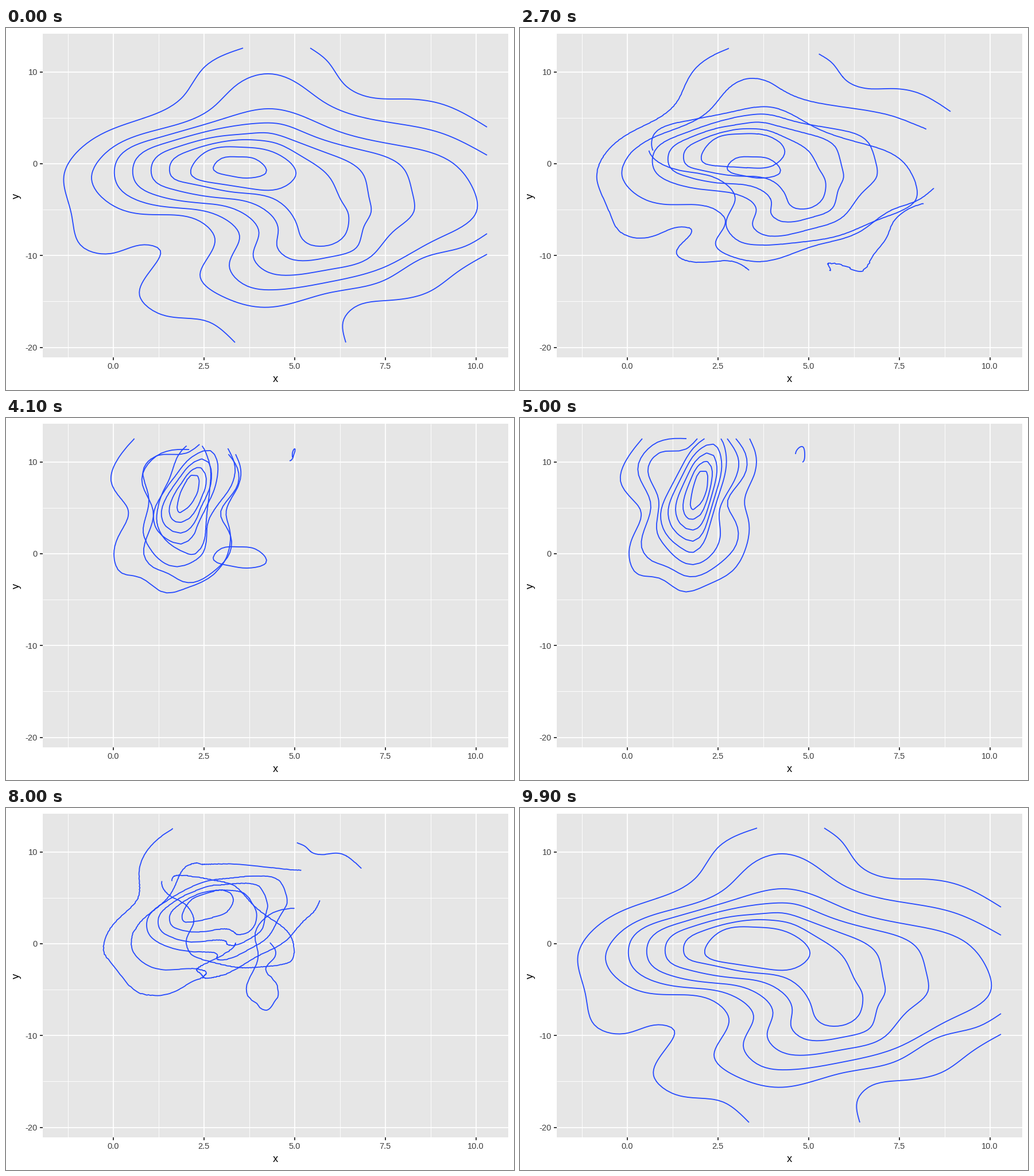
Recreate the animation shown at these times as a matplotlib script. Size 885 by 632 pixels, loop 10 s.

```python
import numpy as np
import matplotlib.pyplot as plt
from matplotlib.animation import FuncAnimation
from matplotlib.patches import Rectangle

W, H, DPI = 885, 632, 100
PT = 72 / DPI
BLUE, PANEL = "#2348FF", "#E6E6E6"
TOP = 36                                # upper edge of the data
FINE, COARSE = (7.46, 5.2), (11.9, 8.3)  # grid steps of the two densities
plt.rcParams["font.family"] = "Liberation Sans"
plt.rcParams["axes.unicode_minus"] = False


def along(p):
    """Distance travelled at each point of a path."""
    return np.r_[0, np.cumsum(np.hypot(*np.diff(p, axis=0).T))]


def spline(pts, closed=False, n=3000):
    """Cubic spline with continuous curvature through a few key points."""
    p = np.array(pts, float)
    if closed:
        p = np.vstack([p[-4:], p, p[:5]])
    t = along(p)
    h = np.diff(t)
    d = np.diff(p, axis=0) / h[:, None]
    diag = np.r_[2, 2 * (h[:-1] + h[1:]), 2]
    m = np.diag(diag) + np.diag(np.r_[1, h[:-1]], 1) + np.diag(np.r_[h[1:], 1], -1)
    mid = h[1:, None] * d[:-1] + h[:-1, None] * d[1:]
    m = np.linalg.solve(m, 3 * np.vstack([d[:1], mid, d[-1:]]))

    s = np.linspace(*((t[4], t[-5]) if closed else (t[0], t[-1])), n)
    k = np.clip(np.searchsorted(t, s, side="right") - 1, 0, len(h) - 1)
    w = h[k][:, None]
    u = (s - t[k])[:, None] / w
    return ((1 + 2 * u) * (1 - u) ** 2 * p[k] + u * (1 - u) ** 2 * w * m[k]
            + u * u * (3 - 2 * u) * p[k + 1] + u * u * (u - 1) * w * m[k + 1])


def clip(p):
    """Open a closed curve where it rises above the data."""
    inside = p[:, 1] >= TOP
    if inside.all():
        return p
    start = np.flatnonzero(inside & ~np.roll(inside, 1))[0]
    return np.roll(p, -start, axis=0)[np.roll(inside, -start)]


def contour(pts, step, closed=False):
    """Keep the points of a curve that lie on the density grid."""
    p = spline(pts, closed)
    if closed:
        p = clip(p)
    cell = np.floor((p - [99, 35]) / step)
    keep = np.r_[True, np.any(np.diff(cell, axis=0) != 0, axis=1)]
    keep[-1] = True
    return p[keep]


def nest(outer, inner, levels, step, bend=0):
    """Closed contours spaced between an outer and an inner one."""
    a, b = np.array(outer, float), np.array(inner, float)
    c = np.reshape(bend, (-1, 1))
    return [contour(a + (b - a) * (t + c * t * (1 - t)), step, True) for t in levels]


def resample(p, n):
    t = along(p)
    s = np.linspace(0, t[-1], n)
    return np.column_stack([np.interp(s, t, x) for x in p.T])


# Wide density: open contours, nested family, innermost rings
wide_open = [
    [(413, 35), (343, 71), (309, 119), (235, 159), (140, 202), (101, 257),
     (114, 325), (129, 378), (181, 394), (250, 379), (268, 387), (255, 419),
     (233, 468), (265, 498), (353, 513), (399, 549)],
    [(530, 35), (560, 58), (590, 99), (630, 120), (700, 124), (760, 133), (838, 173)],
    [(838, 395), (785, 427), (740, 459), (660, 476), (605, 489), (588, 510), (592, 549)],
    [(838, 222), (760, 184), (640, 160), (555, 130), (500, 92), (460, 80),
     (405, 97), (360, 139), (255, 180), (165, 227), (149, 260), (190, 312),
     (270, 326), (345, 342), (364, 368), (338, 432), (380, 470), (465, 487),
     (560, 463), (660, 440), (730, 400), (800, 381), (838, 359)],
]
wide_outer = [
    (193, 272), (235, 303), (310, 315), (375, 330), (407, 364), (389, 415),
    (410, 445), (468, 457), (560, 444), (658, 418), (750, 369), (821, 315),
    (811, 275), (780, 237), (690, 206), (570, 177), (500, 148), (462, 141),
    (380, 158), (260, 193), (192, 234)]
wide_inner = [
    (287, 257), (318, 271), (400, 287), (470, 300), (508, 347), (514, 365),
    (527, 377), (545, 381), (570, 377), (590, 362), (597, 340), (596, 323),
    (585, 303), (566, 264), (515, 224), (470, 201), (440, 196), (415, 195),
    (365, 201), (315, 216), (287, 236)]
# Levels crowd towards the centre on the right and the upper side
crowd = [0] * 10 + [0.7, 0.7, 0.55] + [0.3] * 4 + [0.6, 0.3, 0, 0]
core = [(322, 254), (365, 271), (430, 281), (485, 277), (505, 256), (475, 221),
        (409, 208), (340, 222)]
peak_pts = [(361, 245), (390, 258), (420, 262), (454, 250), (437, 230), (405, 225),
            (370, 231)]

WIDE = [contour(p, FINE) for p in wide_open]
WIDE += nest(wide_outer, wide_inner, np.linspace(0, 1, 4), FINE, crowd)
WIDE += [contour(core, FINE, True)]
PEAK = contour(peak_pts, FINE, True)

# Tall density, in matching order
tall_outside = [(213, 36), (186, 72), (175, 110), (193, 139), (211, 164), (199, 202),
                (190, 240), (204, 272), (241, 279), (283, 303), (325, 292),
                (372, 265), (394, 225), (398, 178), (391, 147), (408, 99),
                (411, 65), (400, 36)]
islet = [(492, 77), (496, 62), (492, 50), (480, 63)]
tall_open = [
    [(290, 36), (240, 42), (205, 90), (228, 150), (213, 230), (229, 249),
     (255, 259), (292, 277), (348, 254), (379, 215), (376, 182), (361, 152),
     (393, 95), (392, 60), (376, 36)],
    [(309, 36), (285, 56), (245, 60), (223, 88), (241, 140), (239, 200),
     (253, 224), (301, 256), (336, 236), (349, 205), (347, 165), (374, 108),
     (381, 75), (361, 36)],
]
tall_outer = [
    (263, 187), (287, 211), (302, 215), (313, 208), (326, 182), (340, 135),
    (350, 98), (350, 68), (338, 46), (313, 55), (288, 90), (269, 128), (258, 163)]
tall_inner = [
    (298, 157), (301, 160), (306, 156), (313, 151), (320, 140), (326, 121),
    (327, 106), (325, 94), (320, 91), (313, 94), (306, 107), (301, 124), (297, 147)]

TALL = [contour(tall_outside, COARSE), spline(islet, True)]
TALL += [contour(p, COARSE) for p in tall_open]
TALL += nest(tall_outer, tall_inner, np.linspace(-1 / 3, 1, 5), COARSE)

PAIRS = [(a, resample(b, len(a))) for a, b in zip(WIDE, TALL)]


def ease(t):
    return 4 * t ** 3 if t < 0.5 else 1 - 4 * (1 - t) ** 3


def progress(i):
    """0 for the wide density, 1 for the tall one."""
    if i < 50:
        return ease(max(i - 12, 0) / 38)
    return 1 - ease(max(i - 63, 0) / 37)


fig = plt.figure(figsize=(W / DPI, H / DPI), dpi=DPI, facecolor="white")
ax = fig.add_axes([0, 0, 1, 1])
ax.set_xlim(0, W)
ax.set_ylim(H, 0)
ax.axis("off")
ax.add_patch(Rectangle((64, 10), 811, 565, fc=PANEL, ec="none", zorder=0))


def rule(xs, ys, width, color="white"):
    ax.plot(xs, ys, color=color, lw=width * PT, solid_capstyle="butt", zorder=1)


def label(x, y, s, size=14.67, color="#3C3C3C", **kw):
    ax.text(x, y, s, fontsize=size * PT, color=color, va="baseline", **kw)


for k in range(5):
    rule([107.5 + 158 * k] * 2, [10, 575], 0.89)
for k in range(3):
    rule([64, 875], [157 + 160.2 * k] * 2, 0.89)
for k in range(5):
    x = 186.5 + 158 * k
    rule([x, x], [10, 575], 1.78)
    rule([x, x], [575, 580], 1.78, "#262626")
    label(x, 595, f"{2.5 * k:.1f}", ha="center")
for k in range(4):
    y = 77 + 160.2 * k
    rule([64, 875], [y, y], 1.78)
    rule([59, 64], [y, y], 1.78, "#262626")
    label(55, y + 5.3, str(10 - 10 * k), ha="right")
label(469.5, 618, "x", 18.33, "black", ha="center")
label(22.5, 293, "y", 18.33, "black", ha="center", rotation=90,
      rotation_mode="anchor")

style = dict(color=BLUE, lw=1.78 * PT, solid_joinstyle="round",
             solid_capstyle="butt", zorder=3)
lines = [ax.plot([], [], **style)[0] for _ in PAIRS]
peak, = ax.plot(*PEAK.T, **style)


def draw(i):
    p = progress(i)
    for line, (a, b) in zip(lines, PAIRS):
        line.set_data(*((1 - p) * a + p * b).T)
    peak.set_visible(i < 50)
    return lines + [peak]


anim = FuncAnimation(fig, draw, frames=100, interval=100, repeat=True, blit=False)
plt.show()
```
